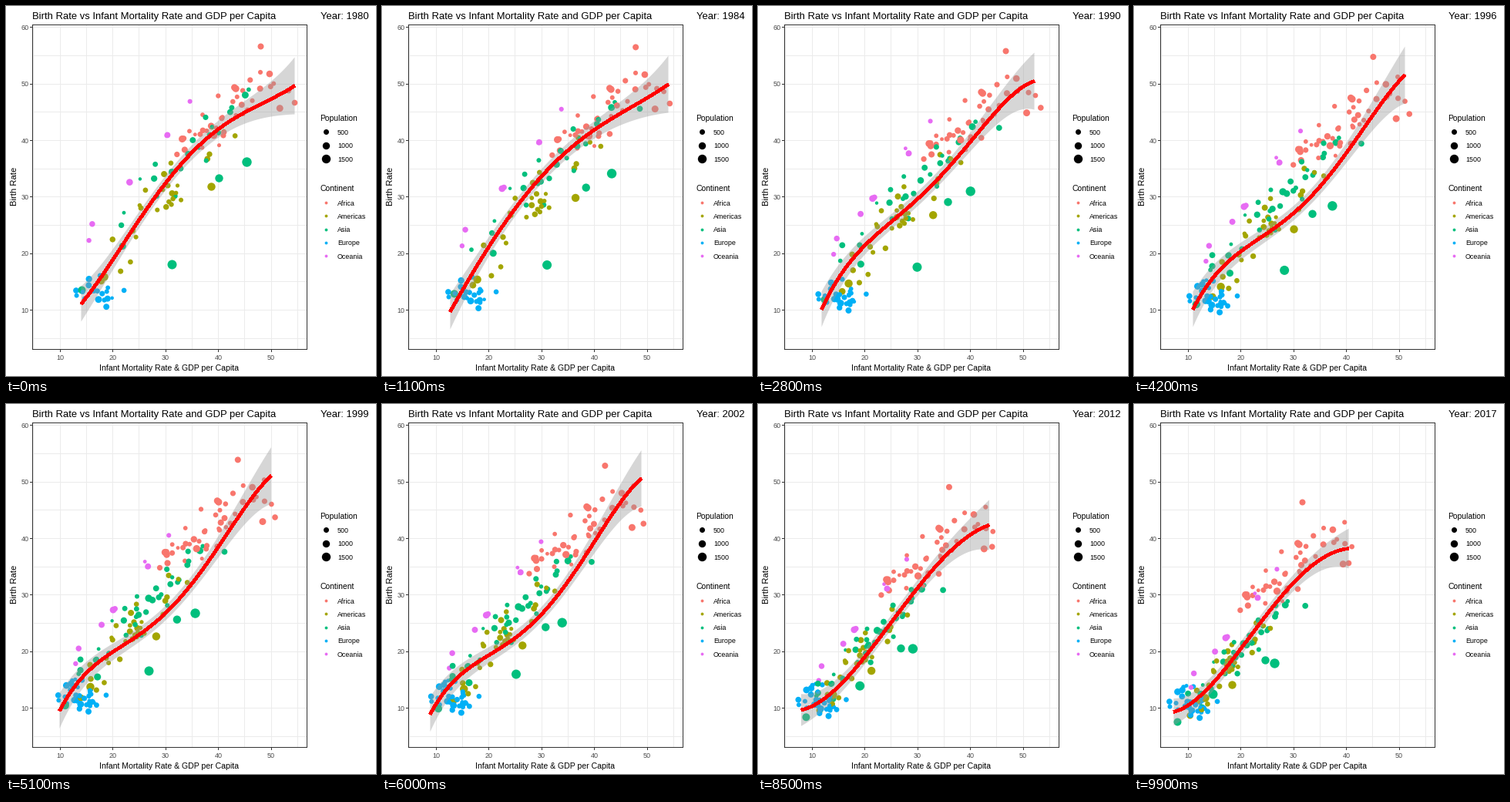
Animation, 480 px wide and 480 px high, one loop 10 s. Source, as a matplotlib script:

```python
import numpy as np
import matplotlib.pyplot as plt
from matplotlib.animation import FuncAnimation

SIZE, FRAMES = 480, 100
plt.rcParams["font.family"] = "Liberation Sans"
rng = np.random.default_rng(1980)

COLORS = {"Africa": "#F8766D", "Americas": "#A3A500", "Asia": "#00BF7D",
          "Europe": "#00B0F6", "Oceania": "#E76BF3"}

fig = plt.figure(figsize=(SIZE / 72, SIZE / 72), dpi=72, facecolor="white")
ax = fig.add_axes([0, 0, 1, 1])
ax.set(xlim=(0, SIZE), ylim=(SIZE, 0))
ax.axis("off")

starts, ends, eases, radii, births, tints = [], [], [], [], [], []


def add_dots(name, start, end, ease, radius, birth=0):
    """Dots that drift from start to end and appear at frame birth."""
    n = len(start)
    starts.append(start)
    ends.append(end)
    eases.append(np.full(n, ease))
    radii.append(np.broadcast_to(radius, n))
    births.append(np.broadcast_to(birth, n))
    tints.extend([COLORS[name]] * n)


def add_cloud(name, early, late, start, end, width, slope, scatter,
              shrink=1, ease=1):
    """A continent's tilted cloud, with some dots joining later."""
    n = early + late
    along = width * rng.triangular(-2, 0, 2, n)
    offset = np.column_stack(
        [along, slope * along + scatter * rng.triangular(-2, 0, 2, n)])
    birth = np.where(np.arange(n) < early, 0, rng.integers(6, 44, n))
    add_dots(name, start + offset, end + offset * shrink, ease,
             rng.triangular(2, 3.6, 4.7, n), birth)


def add_dot(name, start, end, radius, ease=1):
    add_dots(name, np.array([start]), np.array([end]), ease, radius)


add_cloud("Africa", 39, 6, (298, 139), (214, 214), 44, -.62, 24, ease=2)
add_cloud("Americas", 27, 4, (206, 247), (122, 338), 52, -1, 27, shrink=.6)
add_cloud("Asia", 22, 14, (222, 200), (136, 318), 78, -1, 27, shrink=.68)
add_cloud("Europe", 18, 17, (122, 371), (77, 388), 18, .15, 12)
add_cloud("Oceania", 6, 3, (190, 207), (144, 285), 52, -.9, 25, shrink=.85)

# The largest and outermost dots
add_dot("Africa", (330, 52), (218, 127), 4, ease=2)
add_dot("Africa", (374, 125), (278, 206), 3.8, ease=2)
add_dot("Americas", (127, 351), (92, 381), 5.2)
add_dot("Americas", (266, 234), (127, 364), 5.2)
add_dot("Asia", (215, 335), (102, 376), 6, ease=2)
add_dot("Asia", (312, 202), (182, 336), 6.2)
add_dot("Asia", (276, 223), (170, 332), 5.2)
add_dot("Asia", (98, 368), (56, 412), 5)

order = rng.permutation(len(tints))
start, end = np.vstack(starts)[order], np.vstack(ends)[order]
ease, radius, birth = (np.concatenate(p)[order]
                       for p in (eases, radii, births))
tints = [tints[i] for i in order]

# Trend keys: frame, left x, right x, five evenly spaced heights
TREND = np.array([
    (0, 97, 374, 386, 286, 195, 140, 103),
    (11, 88, 371, 396, 281, 197, 144, 101),
    (28, 82, 358, 393, 298, 237, 159, 97),
    (42, 76, 351, 393, 313, 262, 180, 89),
    (60, 62, 336, 402, 330, 280, 190, 96),
    (71, 60, 321, 394, 351, 270, 185, 126),
    (99, 51, 278, 399, 355, 282, 217, 187)])


def px(x):
    return 1.5 + 6.85 * x


def py(y):
    return 467.9 - 7.337 * y


def line(xs, ys, color, z):
    # Whole coordinates snap onto the pixel of that number
    ax.plot(np.floor(xs), np.floor(ys), color=color, lw=1, aa=False,
            zorder=z, solid_capstyle="butt", snap=True)


def label(x, y, s, size, color="black", **kw):
    return ax.text(x, y, s, fontsize=size, color=color, zorder=9, **kw)


def legend_dot(y, r, color):
    ax.scatter(415, y, s=4 * r * r, c=color, lw=0)


L, R, T, B = 34, 390, 24, 445
GRID, DARK, GREY = "#EBEBEB", "#333333", "#4D4D4D"
for v in range(5, 61, 5):
    if v < 60:
        line([px(v)] * 2, [T, B], GRID, 1)
    line([L, R], [py(v)] * 2, GRID, 1)
    if v % 10 == 0:
        line([L - 3, L], [py(v)] * 2, DARK, 6)
        label(29.5, py(v) + 3.3, str(v), 9, GREY, ha="right")
        if v < 60:
            line([px(v)] * 2, [B, B + 3], DARK, 6)
            label(px(v), 459, str(v), 9, GREY, ha="center")
line([L, R, R, L, L], [T, T, B, B, T], DARK, 6)

label(34, 17, "Birth Rate vs Infant Mortality Rate and GDP per Capita", 12.95)
year = label(408, 17, "", 12.95)
label(211.5, 473, "Infant Mortality Rate & GDP per Capita", 10.5, ha="center")
label(16.5, 234, "Birth Rate", 11.2, rotation=90, ha="right", va="center")

label(407, 149, "Population", 10.4)
for i, (s, r) in enumerate((("500", 3.5), ("1000", 4.7), ("1500", 5.7))):
    y = 163 + 17.5 * i
    legend_dot(y, r, "black")
    label(430, y + 4, s, 8.9)
label(407, 240, "Continent", 10.4)
for i, (name, color) in enumerate(COLORS.items()):
    y = 255 + 17.25 * i
    legend_dot(y, 1.9, color)
    label(430, y + 3.7, name, 8.9)

points = ax.scatter(*start.T, c=tints, lw=0, zorder=3)
band, = ax.fill([0], [0], color="#999999", alpha=.4, lw=0, zorder=4)
trend, = ax.plot([], [], color="red", lw=3.6, zorder=5, aa=False,
                 solid_capstyle="butt", solid_joinstyle="round")

u = np.linspace(0, 1, 80)
knots = np.linspace(0, 1, 5)


def draw(f):
    t = f / (FRAMES - 1)
    year.set_text(f"Year: {round(1980 + 37 * t)}")

    k = (t ** ease)[:, None]
    pos = start + (end - start) * k
    pos[:, 1] = np.minimum(pos[:, 1], 413)
    points.set_offsets(pos + .5)
    points.set_sizes(np.where(f >= birth, 4 * radius ** 2, 0))

    left, right, *heights = (np.interp(f, TREND[:, 0], col)
                             for col in TREND.T[1:])
    x = left + (right - left) * u + .5
    y = np.polyval(np.polyfit(knots, heights, 4), u) + .5
    flare = 1 - .4 * t ** 6
    half = 9 + flare * (14 * (1 - u) ** 7 + 28 * u ** 6)
    trend.set_data(x, y)
    band.set_xy(np.column_stack([np.r_[x, x[::-1]],
                                 np.r_[y - half, (y + half)[::-1]]]))
    return points, band, trend, year


anim = FuncAnimation(fig, draw, frames=FRAMES, interval=100, repeat=True,
                     repeat_delay=0, blit=False)
plt.show()
```
